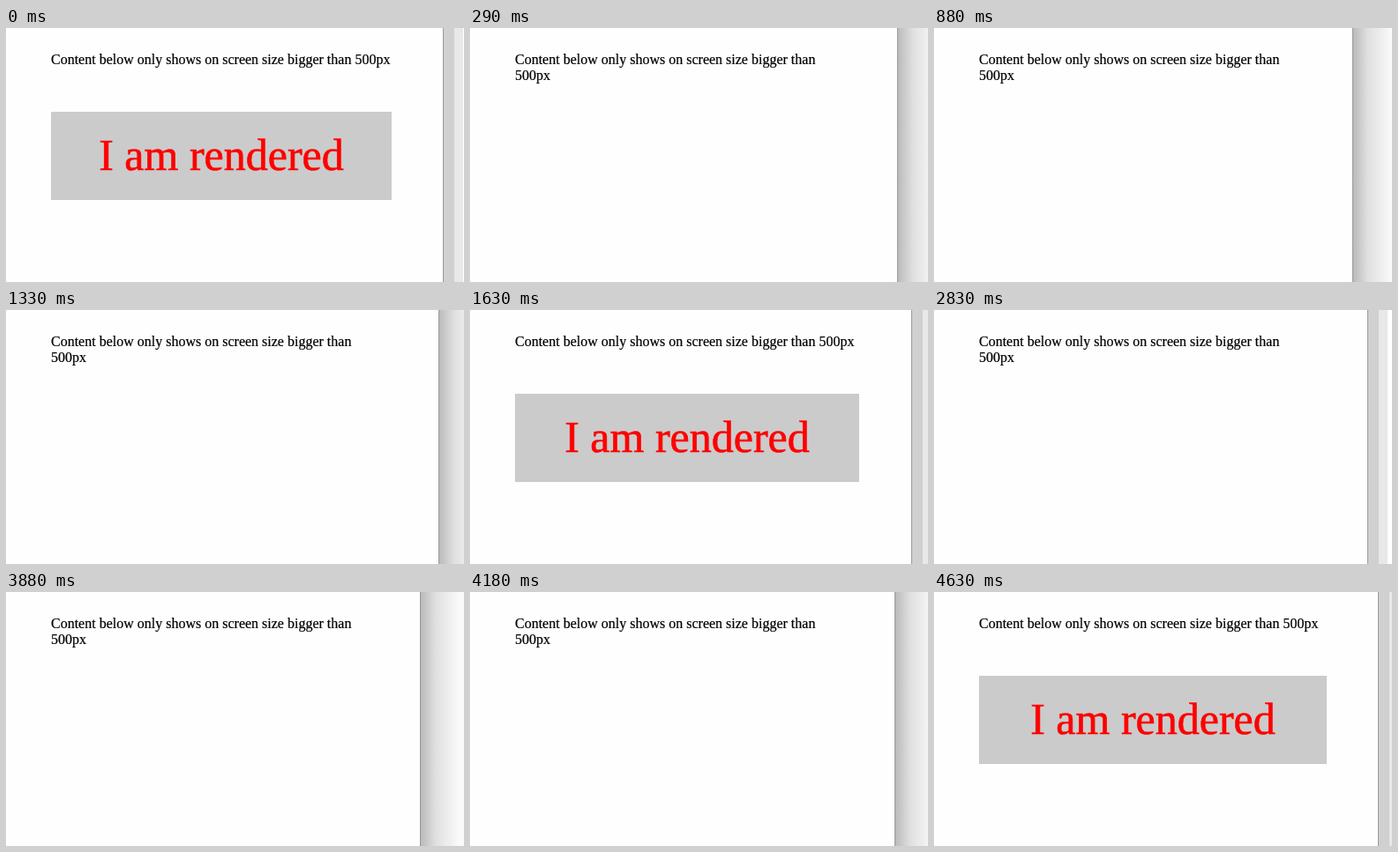
Write an HTML page with a canvas that moves like this. It is 519x288 px and loops after 5980 ms.

```html
<!DOCTYPE html>
<html lang="en">
<head>
<meta charset="utf-8">
<title>Responsive content</title>
<style>
  html, body { margin: 0; width: 100%; height: 100%; overflow: hidden; background: #fff; }
  canvas { display: block; }
</style>
</head>
<body>
<canvas id="stage" width="519" height="288"></canvas>
<script>
const ctx = document.getElementById('stage').getContext('2d');
const LOOP = 5980, STEP = 150, OFFSET = 20;
const W = 519, H = 288, LEFT = 51, BREAKPOINT = 493.4, SHADOW = 45;
const FONT = '"Liberation Serif", "Times New Roman", serif';
const MESSAGE = 'Content below only shows on screen size bigger than';

// Drag turning points: [time in ms, x of the window's right edge]
const drag = [
  [-OFFSET, 495], [580, 472], [730, 472], [1780, 501.6], [2380, 501.6],
  [2980, 489], [3130, 489], [3880, 469], [4630, 503], [LOOP, 503]
];

function edgeAt(t) {
  const time = Math.max(t, -OFFSET);
  const i = drag.findIndex(([end]) => end > time);
  const [t0, x0] = drag[i - 1], [t1, x1] = drag[i];
  const u = (time - t0) / (t1 - t0);
  return x0 + (x1 - x0) * u * u * (3 - 2 * u);
}

function rect(x, y, w, h, color) {
  ctx.fillStyle = color;
  ctx.fillRect(x, y, w, h);
}

// A hairline outline gives the slightly heavier desktop text rendering.
function text(str, x, y, size, color, align = 'left') {
  ctx.font = `${size}px ${FONT}`;
  ctx.textAlign = align;
  ctx.fillStyle = ctx.strokeStyle = color;
  ctx.lineWidth = size / 80;
  ctx.fillText(str, x, y);
  ctx.strokeText(str, x, y);
}

function drawShadow(x, banded) {
  if (banded) {
    rect(x, 0, 13, H, '#d0d0d0');
    rect(x + 13, 0, 10, H, '#e8e8e8');
    rect(x + 23, 0, W, H, '#fff');
  } else {
    const fade = ctx.createLinearGradient(x, 0, x + SHADOW, 0);
    fade.addColorStop(0, '#b8b8b8');
    fade.addColorStop(0.4, '#e0e0e0');
    fade.addColorStop(1, '#fafafa');
    rect(x, 0, W, H, fade);
  }
  rect(x, 0, 1, H, '#999');
}

function draw(time) {
  const t = Math.floor((time + OFFSET) / STEP) * STEP - OFFSET;
  const edge = edgeAt(t);
  const wide = edge > BREAKPOINT;
  const wasWide = edgeAt(t - STEP) > BREAKPOINT;

  rect(0, 0, W, H, '#fefefe');
  text(MESSAGE + (wide ? ' 500px' : ''), LEFT, 41, 16, '#000');
  if (wide) {
    const right = Math.floor(edge - 58);
    rect(LEFT, 95, right - LEFT, 100, '#cbcbcb');
    text('I am rendered', (LEFT + right) / 2, 161, 50, '#f00', 'center');
  } else {
    text('500px', LEFT, 59, 16, '#000');
  }
  drawShadow(Math.round(edge), wide || wasWide);
}

function tick() {
  draw(performance.now() % LOOP);
  requestAnimationFrame(tick);
}
tick();
</script>
</body>
</html>
```
